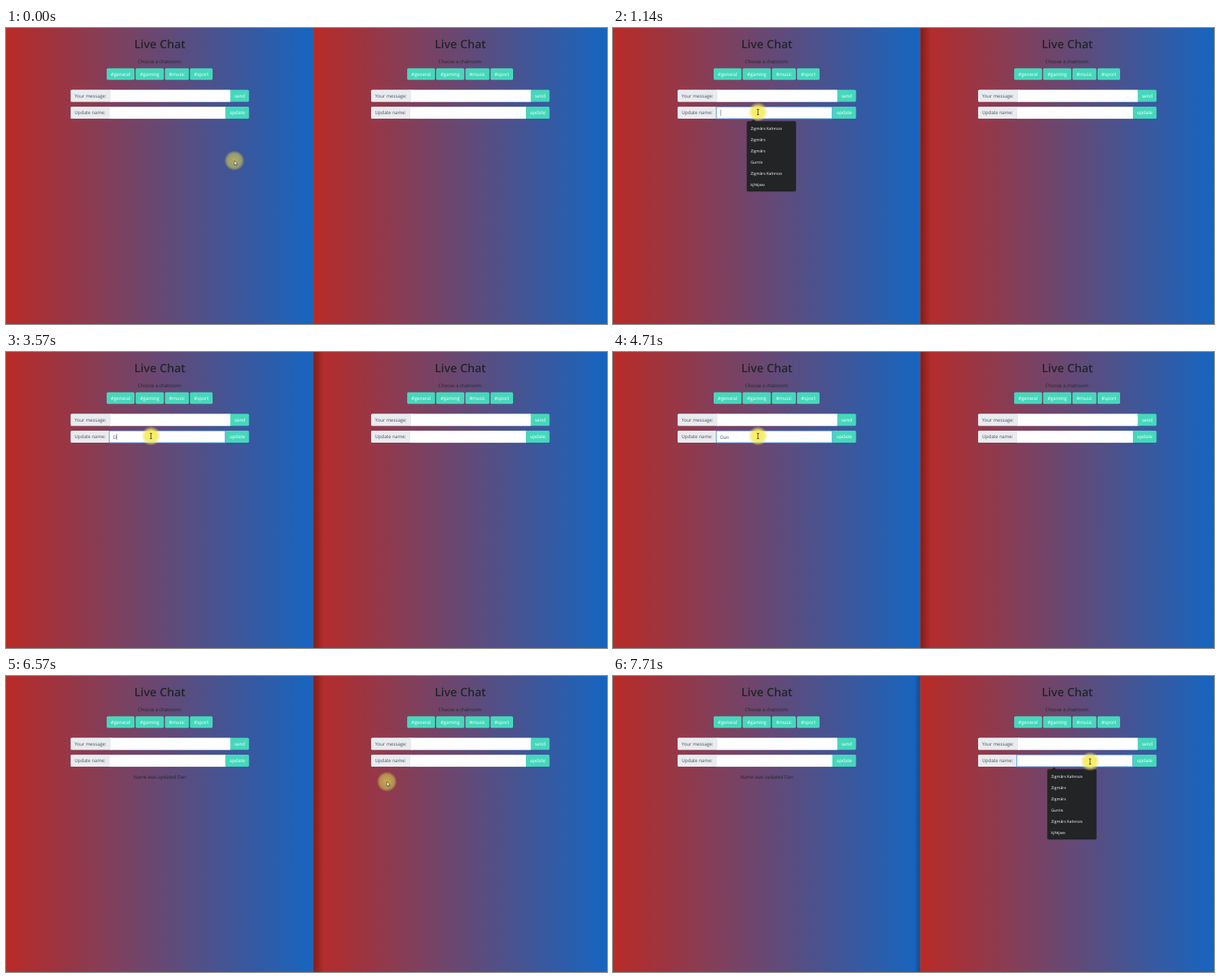
An HTML page that plays this animation: 800x395 px, repeating every 8000 ms.

```html
<!DOCTYPE html>
<html lang="en">
<head>
<meta charset="utf-8">
<title>Live Chat</title>
<style>
  html, body { margin: 0; width: 100%; height: 100%; overflow: hidden; }
  svg { display: block; width: 100vw; height: 100vh; }
  text {
    font: 400 6.25px "Open Sans", "Noto Sans", sans-serif;
    text-rendering: geometricPrecision;
    fill: #212529;
  }
  .title { font-size: 15.4px; font-weight: 600; }
  .button { fill: #fff; font-weight: 500; }
  .label { fill: #495057; }
  .option { fill: #fff; font-size: 5.25px; }
</style>
</head>
<body>
<svg id="stage" viewBox="0 0 800 395" preserveAspectRatio="none">
  <defs>
    <linearGradient id="sky"><stop stop-color="#b92b27"/><stop offset="1" stop-color="#1565c0"/></linearGradient>
    <linearGradient id="shade"><stop stop-opacity=".32"/><stop offset="1" stop-opacity="0"/></linearGradient>
    <linearGradient id="shadeBack"><stop stop-opacity="0"/><stop offset="1" stop-opacity=".25"/></linearGradient>
    <radialGradient id="glow">
      <stop stop-color="#f7f05a" stop-opacity=".95"/>
      <stop offset=".6" stop-color="#f5ea55" stop-opacity=".85"/>
      <stop offset="1" stop-color="#f0dc50" stop-opacity="0"/>
    </radialGradient>
    <radialGradient id="dimGlow">
      <stop stop-color="#d6cf58" stop-opacity=".75"/>
      <stop offset=".75" stop-color="#d0c850" stop-opacity=".6"/>
      <stop offset="1" stop-color="#c8c04c" stop-opacity=".1"/>
    </radialGradient>
  </defs>
</svg>
<script>
const LOOP = 8000;
const TEAL = "#46d7bb";
const NAME = "Dan";
const OPTIONS = ["Zigmārs Kalnrozs", "Zigmārs", "Zigmārs", "Guntis", "Zigmārs Kalnrozs", "kjhkjwo"];
const stage = document.getElementById("stage");

function add(parent, tag, attrs, content) {
  const node = document.createElementNS("http://www.w3.org/2000/svg", tag);
  for (const key in attrs) node.setAttribute(key, attrs[key]);
  if (content) node.textContent = content;
  parent.appendChild(node);
  return node;
}

function box(parent, x1, y1, x2, y2, fill, rx = 0) {
  return add(parent, "rect", { x: x1, y: y1, width: x2 - x1, height: y2 - y1, fill, rx });
}

function write(parent, x, y, content, cls, anchor = "middle") {
  return add(parent, "text", { x, y, class: cls, "text-anchor": anchor }, content);
}

function show(node, on) {
  node.setAttribute("visibility", on ? "visible" : "hidden");
}

// One input row: grey label, white field, teal button.
function addRow(parent, y, label, split, end, action) {
  box(parent, 86, y, 323.5, y + 16, TEAL, 1.7);
  box(parent, 86, y, split + 3, y + 16, "#e9ecef", 1.7);
  box(parent, split, y, end, y + 16, "#fff");
  box(parent, split - .2, y, split + .2, y + 16, "#ced4da");
  write(parent, 91.2, y + 10.2, label, "label", "start");
  write(parent, (end + 323.5) / 2, y + 10.2, action, "button");
}

function addDropdown(parent) {
  const list = add(parent, "g", {});
  box(list, 177.6, 124.2, 244, 218.6, "rgba(0,0,0,.25)", 2.2);
  add(list, "path", { d: "M183.5 125 187 121.8 190.5 125Z", fill: "#222426" });
  box(list, 178.3, 124.6, 243.4, 218, "#222426", 1.8);
  OPTIONS.forEach((name, i) => write(list, 183.3, 135.9 + i * 15, name, "option", "start"));
  return list;
}

function addPage(offset, left, right) {
  box(stage, left, 0, right, 395, "url(#sky)");
  const page = add(stage, "g", { transform: `translate(${offset})` });
  write(page, 204.8, 26.6, "Live Chat", "title");
  write(page, 204.8, 47.4, "Choose a chatroom:");
  [["#general", 134, 171], ["#gaming", 172.5, 210], ["#music", 211.5, 243.5], ["#sport", 245, 275]]
    .forEach(([room, x1, x2]) => {
      box(page, x1, 53.7, x2, 69.2, TEAL, 1.7);
      write(page, (x1 + x2) / 2, 63.7, room, "button");
    });
  addRow(page, 82.6, "Your message:", 138.5, 298.5, "send");
  addRow(page, 105.1, "Update name:", 137.5, 292, "update");
  const ring = box(page, 137.3, 105.2, 291.8, 121, "none");
  ring.setAttribute("stroke", "#3f8fe0");
  ring.setAttribute("stroke-width", .8);
  const field = write(page, 142.8, 115.5, "", "label", "start");
  const caret = box(page, 142.9, 109, 143.4, 117.3, "#343a40");
  const notice = write(page, 204.8, 136.6, "Name was updated " + NAME);
  return { ring, field, caret, notice, list: addDropdown(page) };
}

const first = addPage(0, 0, 409);
const second = addPage(400, 409, 800);
const shadeRight = box(stage, 409, 0, 423, 395, "url(#shade)");
const shadeLeft = box(stage, 401, 0, 409, 395, "url(#shadeBack)");
box(stage, 408.6, 0, 409.4, 395, "#8f4a52");

const pointer = add(stage, "g", {});
const halo = add(pointer, "circle", { r: 13 });
const arrow = add(pointer, "path", {
  d: "M0 0V6L1.4 4.8 2.4 7 3.4 6.5 2.4 4.4H4.2Z",
  fill: "#fff", stroke: "#111", "stroke-width": .5
});
const beam = add(pointer, "path", {
  d: "M-1.4-3.4H1.4M0-3.4V3.6M-1.4 3.6H1.4",
  fill: "none", stroke: "#222", "stroke-width": .8
});

// Pointer stops: time, x, y; each is held until the next.
const PATH = [
  [0, 304, 177], [140, 285, 163], [290, 244, 137], [430, 207, 117], [570, 193, 112],
  [5290, 205, 112], [5430, 250, 110], [5570, 312, 107], [5710, 340.5, 106],
  [5860, 320, 111], [6000, 309, 114], [6140, 311, 115], [6290, 345, 122],
  [6430, 424, 135], [6570, 507, 141], [6710, 620, 136], [6860, 742, 122],
  [7000, 672, 115], [7140, 635, 114]
];
const CARET_LEFT = [[1000, 1570], [2000, 2570], [3000, 4570], [5000, 5570]];
const CARET_RIGHT = [[7140, 7710]];
const KEYS = [3290, 3860, 4140];

const within = (t, from, to) => t >= from && t < to;
const inAny = (t, spans) => spans.some(([from, to]) => within(t, from, to));

function drawPointer(t) {
  const [, x, y] = PATH.filter(stop => stop[0] <= t).pop();
  const resting = within(t, 570, 5290) || t >= 7140;
  pointer.setAttribute("transform", `translate(${x} ${y})`);
  halo.setAttribute("fill", resting ? "url(#glow)" : "url(#dimGlow)");
  show(beam, resting);
  show(arrow, !resting);
}

function draw(t) {
  const leftFocus = within(t, 1000, 6140);
  const rightFocus = t >= 7140;
  const typed = t < 6140 ? NAME.slice(0, KEYS.filter(k => k <= t).length) : "";

  first.field.textContent = typed;
  const width = typed ? first.field.getComputedTextLength() : 0;
  first.caret.setAttribute("x", 142.9 + width);

  show(first.ring, leftFocus);
  show(first.caret, inAny(t, CARET_LEFT));
  show(first.list, within(t, 1140, 3290));
  show(first.notice, t >= 6140);

  show(second.ring, rightFocus);
  show(second.caret, inAny(t, CARET_RIGHT));
  show(second.list, t >= 7290);
  show(second.notice, false);

  show(shadeRight, within(t, 1000, 7140));
  show(shadeLeft, rightFocus);
  drawPointer(t);
}

const start = performance.now();
function tick() {
  draw((performance.now() - start) % LOOP);
  requestAnimationFrame(tick);
}
tick();
</script>
</body>
</html>
```
